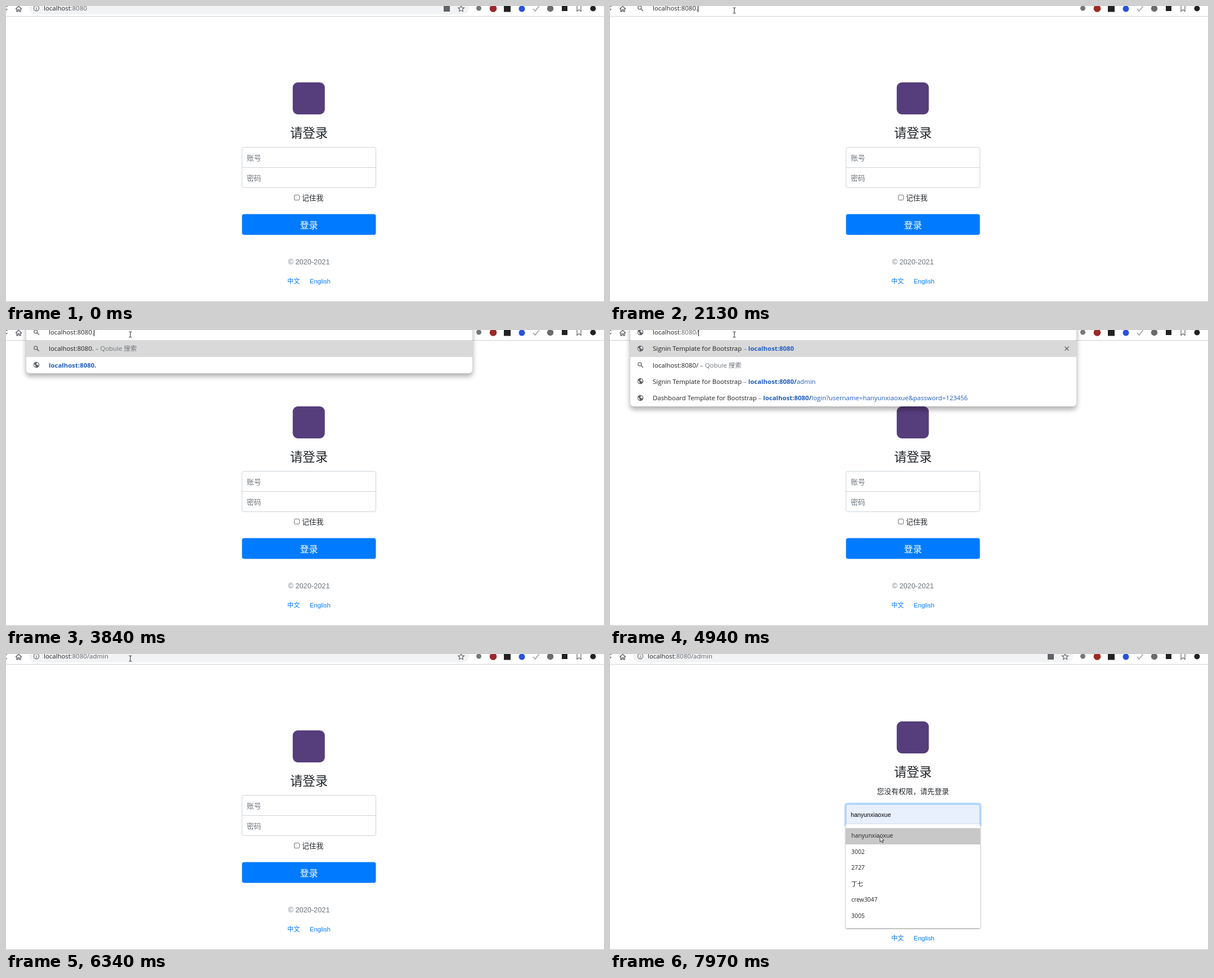
An HTML page that plays this animation: 1063x527 px, repeating every 8 s.

```html
<!DOCTYPE html>
<html lang="zh">
<head>
<meta charset="utf-8">
<title>Login</title>
<style>
html, body { margin: 0; width: 100%; height: 100%; overflow: hidden; background: #fff; }
#stage { position: relative; width: 1063px; height: 527px; overflow: hidden; background: #fff;
  font: 12.8px/20px "Noto Sans CJK SC", "Noto Sans CJK", sans-serif; color: #212529; }
#stage div, #stage svg { position: absolute; box-sizing: border-box; white-space: pre; }
i, em { font-style: normal; }
.mid { left: 0; width: 1077px; text-align: center; }
.latin { font-family: "Liberation Sans", Arial, sans-serif; }
.link { color: #007bff; font-size: 11.2px; }

/* login form */
#page, #head, #form { left: 0; top: 0; width: 1063px; height: 0; }
.denied #head { transform: translateY(-16px); }
.denied #form { transform: translateY(16px); }
#notice { display: none; top: 234px; }
.denied #notice { display: block; }
#logo { left: 510px; top: 136px; width: 57px; height: 57px; border-radius: 9px; background: #563d7c;
  transform: translateX(-.3px); }
.field { left: 419px; width: 239px; height: 37px; padding-left: 8px; line-height: 35px;
  border: 1px solid #ced4da; background: #fff; color: #6c757d; }
#user { top: 251px; border-radius: 4px 4px 0 0; }
#pass { top: 287px; border-radius: 0 0 4px 4px; }
.denied #user { z-index: 1; border-color: #80bdff; box-shadow: 0 0 0 2.6px rgba(0,123,255,.25); }
#user.filled { background: #e8f0fe; color: #000; font: 10.6px/37px "Liberation Sans", Arial, sans-serif; }
#check { left: 512px; top: 336px; width: 10px; height: 10px; border: 1px solid #767676; border-radius: 2px; }
#submit { left: 419px; top: 370px; width: 238px; height: 37px; border-radius: 4px; background: #007bff;
  color: #fff; font-size: 16px; line-height: 36px; text-align: center; transform: translate(.5px, .5px); }

/* saved logins */
#saved { left: 419px; top: 303px; width: 239px; height: 185px; padding-top: 7px; background: #fff;
  border-radius: 2px; box-shadow: 0 1px 3px rgba(0,0,0,.45); }
#saved p { margin: 0; padding-left: 10px; height: 28.5px;
  font: 10.4px/27px "Open Sans", "Noto Sans CJK SC", sans-serif; color: #222; }
#saved.hover p:first-child { background: #c8c8c8; }

/* browser bar */
#bar { left: 0; top: 0; width: 1063px; height: 19px; background: #fff; border-bottom: 1px solid #cfd1d4; }
#bar svg, #mouse { left: 0; top: 0; }
#pill { left: 41px; top: -9px; width: 782px; height: 24px; border-radius: 12px; background: #f1f3f4; }
.focus #pill { background: #fff; box-shadow: 0 0 0 2px #1a73e8; }
.edit #pill { background: #fff; }
#drop { left: 35.5px; top: -10px; width: 793px; padding-top: 28.2px; background: #fff;
  border-radius: 0 0 7px 7px; overflow: hidden; }
#shade { left: 35.5px; top: -10px; width: 793px; border-radius: 0 0 7px 7px;
  box-shadow: 0 5px 8px 1px rgba(0,0,0,.3); }
#drop p { position: relative; margin: 0; height: 29.4px; padding-left: 40.5px; line-height: 29.4px; }
#drop p:first-child { background: #d9d9d9; }
#drop, #url { font-family: "Open Sans", "Noto Sans CJK SC", sans-serif; font-size: 11.42px; color: #202124; }
#drop svg { left: 12.5px; top: 8.5px; }
#drop svg.x { left: 770px; }
#drop em { color: #1f5cbf; }
#drop i { color: #70757a; }
#url { left: 67px; top: -6px; }
.edit #url { left: 76px; }
#url i { color: #5f6368; }
#url u { border-left: 1px solid #000; margin-right: -1px; text-decoration: none; }
#url mark { background: #0078d7; color: #fff; }
#lead { left: 48px; top: -2px; }
#foot { left: 0; top: 526px; width: 1063px; height: 1px; background: #bfbfbf; }
</style>
</head>
<body>
<div id="stage">
  <svg width="0" height="0"><defs>
    <symbol id="info" viewBox="0 0 12 12"><circle cx="6" cy="6" r="4.6" fill="none" stroke="#5f6368" stroke-width="1.1"/><path d="M6 5.4v3M6 3.4v1" stroke="#5f6368" stroke-width="1.2"/></symbol>
    <symbol id="search" viewBox="0 0 12 12"><circle cx="4.8" cy="4.8" r="3" fill="none" stroke="#5f6368" stroke-width="1.3"/><path d="M7 7l3.8 3.8" stroke="#5f6368" stroke-width="1.5"/></symbol>
    <symbol id="globe" viewBox="0 0 12 12"><circle cx="6" cy="6" r="5.3" fill="#5f6368"/><path d="M1.8 4.6l2.6 2.6v1.6l1.2 1.3a4.3 4.3 0 0 1-3.8-5.5zM7 1.9v1.3l-1.4 1v1.2h2.6v1.6h1.5a4.2 4.2 0 0 0-2.7-5.1z" fill="#fff"/></symbol>
    <symbol id="cross" viewBox="0 0 12 12"><path d="M2.5 2.5l7 7m0-7l-7 7" stroke="#5f6368" stroke-width="1.3"/></symbol>
  </defs></svg>

  <div id="page">
    <div id="head">
      <div id="logo"></div>
      <div class="mid" style="top:214px;font-size:22.4px">请登录</div>
    </div>
    <div id="notice" class="mid">您没有权限，请先登录</div>
    <div id="form">
      <div id="user" class="field">账号</div>
      <div id="pass" class="field">密码</div>
      <div id="check"></div>
      <div style="left:526px;top:331px">记住我</div>
      <div id="submit">登录</div>
      <div class="mid latin" style="top:446px;color:#6c757d">© 2020-2021</div>
      <div class="link" style="left:500px;top:479px">中文</div>
      <div class="link latin" style="left:540px;top:480px">English</div>
    </div>
    <div id="saved"><p>hanyunxiaoxue</p><p>3002</p><p>2727</p><p>丁七</p><p>crew3047</p><p>3005</p></div>
  </div>

  <div id="bar">
    <div id="pill"></div>
    <svg width="1063" height="18" fill="none" stroke="#5f6368" stroke-width="1.4">
      <path id="reload" d="M-1 .5h3v-3M-1 7.8Q1.2 7 2 4.8"/>
      <path id="stop" d="M-7.5 0l9 9m0-9l-9 9"/>
      <path d="M17 5.5L22.5 .5L28 5.500M19 4.500v5.300h2.300v-3h2.400v3h2.300V4.500"/>
      <rect id="translate" x="778" y="0" width="11" height="10" fill="#5f6368" stroke="none"/>
      <path id="star" stroke-width="1.1" d="M809-.8l1.5 3.7 4 .3-3 2.6.9 3.9-3.400-2.100-3.400 2.100.9-3.900-3-2.600 4-.3z"/>
      <g stroke="none">
        <circle cx="840.5" cy="4" r="4.5" fill="#777"/>
        <circle cx="866" cy="4.500" r="6.300" fill="#9c2a26"/>
        <rect x="885" y="-1" width="12" height="11.5" fill="#222"/>
        <circle cx="917" cy="5" r="5.5" fill="#2b50dc"/>
        <circle cx="967.5" cy="4.5" r="5.7" fill="#6b6b6b"/>
        <rect x="988" y="0" width="10" height="9" fill="#222"/>
        <circle cx="1043.5" cy="4.5" r="5" fill="#222"/>
      </g>
      <path d="M937 5l3.5 4 7-8.5" stroke="#a8a8a8" stroke-width="1.8"/>
      <path d="M1015-2v11.5l3.5-3 3.5 3V-2" stroke-width="1.2"/>
    </svg>
  </div>
  <div id="shade"></div>
  <div id="drop"></div>
  <svg id="lead" width="12" height="12"><use id="leadIcon" href="#info"/></svg>
  <div id="url"></div>
  <div id="foot"></div>
  <svg id="mouse" width="20" height="20" style="overflow:visible">
    <path id="beam" d="M-2.5-5Q0-5 0-4Q0-5 2.5-5M0-4V4M-2.5 5Q0 5 0 4Q0 5 2.5 5" fill="none" stroke="#222"/>
    <path id="arrow" d="M.5.5v10l2.3-2.1 1.6 3.5 1.7-.8-1.6-3.3h3.1z" fill="#fff" stroke="#222" stroke-width=".9"/>
  </svg>
</div>
<script>
const LOOP = 8000, HOST = 'localhost:8080', CARET = '<u></u>';
const $ = id => document.getElementById(id);
const show = (id, on) => { $(id).style.visibility = on ? 'visible' : 'hidden'; };
const dim = text => text.slice(0, 9) + `<i>${text.slice(9)}</i>`;
const mark = text => `<mark>${text}</mark>`;

const icon = (name, cls = '') => `<svg class="${cls}" width="12" height="12"><use href="#${name}"/></svg>`;
const searchRow = text => `<p>${icon('search')}${text}<i> – Qobule 搜索</i></p>`;
const pageRow = (title, match, rest = '', extra = '') =>
  `<p>${icon('globe')}${title} Template for Bootstrap<i> – </i><em><b>${match}</b>${rest}</em>${extra}</p>`;
const close = icon('cross', 'x');

const guess = text => [searchRow(text), `<p>${icon('globe')}<em><b>${text}</b></em></p>`];
const recent = slash => {
  const match = HOST + slash, rest = slash ? '' : '/';
  return [
    pageRow('Signin', HOST, '', close),
    searchRow(match),
    pageRow('Signin', match, rest + 'admin'),
    pageRow('Dashboard', match, rest + 'login?username=hanyunxiaoxue&amp;password=123456')
  ];
};
const complete = (typed, tail) => [pageRow('Signin', HOST + typed, tail, close), searchRow(HOST + typed)];

const dotted = (at, tail, caret = CARET) =>
  [at, 'edit', HOST + tail + caret, 'search', guess(HOST + tail)];
const listed = (at, slash, caret = CARET) =>
  [at, 'edit', dim(HOST + slash) + caret, 'globe', recent(slash)];
const filled = (at, typed, tail) =>
  [at, 'edit', dim(HOST + typed) + mark(tail), 'globe', complete(typed, tail)];

// start, mode, address, icon, suggestions
const phases = [
  [0, 'idle', dim(HOST), 'info', []],
  [980, 'focus', mark(HOST), 'info', []],
  [1290, 'focus', dim(HOST) + CARET, 'info', []],
  [1750, 'focus', dim(HOST), 'info', []],
  [2130, 'edit', HOST + '.' + CARET, 'search', []],
  dotted(2220, '.'), dotted(2450, '.a'), dotted(2600, '.ad'),
  dotted(3060, '.ad', ''), dotted(3610, '.ad'), dotted(3690, '.a'), dotted(3840, '.'),
  listed(4160, ''), listed(4710, '', ''), listed(4940, '/'), listed(5490, '/', ''),
  filled(5640, '/a', 'dmin'), filled(5810, '/ad', 'min'),
  [6270, 'idle', dim(HOST + '/admin'), 'info', []]
];

// time, x, y
const path = [
  [120, 916, 512], [430, 520, 235], [740, 73, 32], [890, 165, 9], [980, 221, 8],
  [6959, 221, 8], [6960, 256, 88], [7340, 480, 286], [7570, 480, 290],
  [7819, 480, 290], [7820, 480, 303], [7970, 479.5, 324]
];
const STEP = 76;

function mouseAt(t) {
  const start = t < 6960 ? 120 : t < 7820 ? 6960 : 7820;
  const time = start + Math.floor((t - start) / STEP + .03) * STEP;
  const next = path.findIndex(p => p[0] > time);
  if (next < 0) return path[path.length - 1].slice(1);
  const a = path[Math.max(0, next - 1)], b = path[next];
  const k = Math.max(0, (time - a[0]) / (b[0] - a[0]));
  return [a[1] + (b[1] - a[1]) * k, a[2] + (b[2] - a[2]) * k];
}

let shown = null;
function showPhase(phase) {
  if (phase === shown) return;
  shown = phase;
  const [, mode, url, lead, rows] = phase;
  $('stage').className = mode;
  $('url').innerHTML = url;
  $('leadIcon').setAttribute('href', '#' + lead);
  $('drop').innerHTML = rows.join('');
  $('shade').style.height = 28.2 + 29.4 * rows.length + 'px';
  show('drop', rows.length);
  show('shade', rows.length);
}

function render(t) {
  const phase = phases.filter(p => p[0] <= t).pop();
  showPhase(phase);
  const loading = t >= 6270 && t < 6500, picked = t >= 7890;
  show('reload', !loading);
  show('stop', loading);
  show('star', phase[1] !== 'edit');
  show('translate', phase[1] !== 'edit' && !loading);

  $('page').className = t >= 6420 ? 'denied' : '';
  show('saved', t >= 7490);
  $('saved').className = picked ? 'hover' : '';
  $('user').className = picked ? 'field filled' : 'field';
  $('user').textContent = picked ? 'hanyunxiaoxue' : '账号';

  const [x, y] = mouseAt(t);
  const overField = x > 419 && x < 658 && (t < 6420 ? y > 251 && y < 324 : y > 267 && y < 304);
  const beam = y < 16 || overField;
  $('mouse').style.transform = `translate(${x}px, ${y}px)`;
  show('beam', t >= 120 && beam);
  show('arrow', t >= 120 && !beam);
}

const began = performance.now();
function tick() {
  render((performance.now() - began) % LOOP);
  requestAnimationFrame(tick);
}
tick();
</script>
</body>
</html>
```
